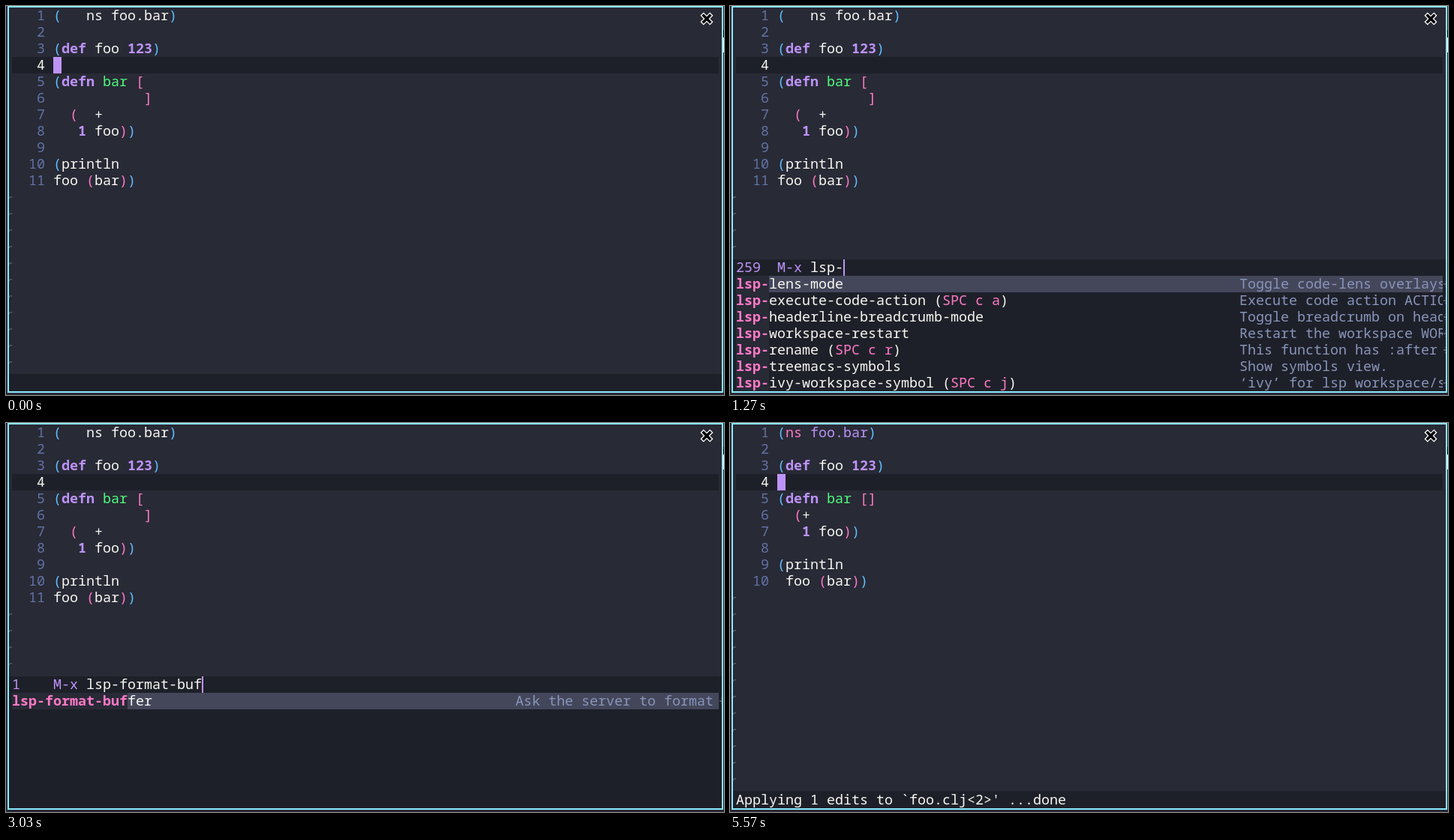
Write an HTML page with a canvas that moves like this. It is 957 px wide and 519 px high and loops after 5660 ms.

```html
<!DOCTYPE html>
<html lang="en">
<head>
<meta charset="utf-8">
<title>Formatting a Clojure buffer</title>
<style>
  html, body { margin: 0; width: 100%; height: 100%; overflow: hidden; background: #282a36; }
  canvas { display: block; }
</style>
</head>
<body>
<canvas id="stage" width="957" height="519"></canvas>
<script>
const ctx = document.getElementById('stage').getContext('2d');
const LOOP = 5660, CW = 11, LH = 22, LEFT = 8, TOP = 2, PANE = 338, ECHO = 492;
const FONT = '18.33px "Noto Sans Mono", "DejaVu Sans Mono", monospace';
const C = {
  bg: '#282a36', dark: '#1e2029', sel: '#44475a', frame: '#8be9fd', mark: '#565761',
  w: '#f8f8f2', b: '#61bfff', p: '#ff79c6', v: '#bd93f9', g: '#50fa7b', n: '#6272a4', d: '#8995bb'
};

// {x...} colours a run with C.x; an upper-case key also makes it bold
const before = [
  '{b(}   ns foo.bar{b)}', '',
  '{b(}{Vdef} foo {V123}{b)}', '',
  '{b(}{Vdefn} {gbar} {p[}',
  '           {p]}',
  '  {p(}  +',
  '   {V1} foo{p)}{b)}', '',
  '{b(}println',
  'foo {p(}bar{p)}{b)}'
];
const after = [
  '{b(}{pns} {vfoo.bar}{b)}', ...before.slice(1, 4),
  '{b(}{Vdefn} {gbar} {p[]}',
  '  {p(}+',
  ...before.slice(7, 10),
  ' foo {p(}bar{p)}{b)}'
];
const afterPlain = ['{b(}ns foo.bar{b)}', ...after.slice(1)];

// name: [description, key binding]
const cmds = {
  'lsp': ['Entry point for the server startup.'],
  'lsp-lens-mode': ['Toggle code-lens overlays.'],
  'lsp-execute-code-action': ['Execute code action ACTION.', 'SPC c a'],
  'lsp-headerline-breadcrumb-mode': ['Toggle breadcrumb on headerline.'],
  'lsp-workspace-restart': ['Restart the workspace WORKSPACE'],
  'lsp-rename': ['This function has :after advice', 'SPC c r'],
  'lsp-treemacs-symbols': ['Show symbols view.'],
  'lsp-ivy-workspace-symbol': ['‘ivy’ for lsp workspace/symbol.', 'SPC c j'],
  'lsp-clojure-server-info': ['Request server info.'],
  'lsp-clojure-cycle-coll': ['Apply cycle-coll refactoring'],
  'lsp-install-server': ['Interactively install server.'],
  'lsp-format-buffer': ['Ask the server to format this document.'],
  'lsp-format-region': ['Ask the server to format the region'],
  'lsp-find-references': ['Find references of the symbol'],
  'lsp-find-definition': ['Find definitions of the symbol'],
  'lsp-find-declaration': ['Find declarations of the symbol'],
  'lsp-find-implementation': ['Find implementations of the symbol'],
  'lsp-find-type-definition': ['Find type definitions of the symbol']
};
const names = Object.keys(cmds);
const common = names.slice(1, 8);
const server = [...names.slice(5, 9), 'lsp', ...names.slice(9, 11)];
const finds = names.slice(11);
const formats = finds.slice(0, 2);
const DONE = "Applying 1 edits to `foo.clj<2>' ...done";

const prompt = (count, input, list, pick = 0, echo = '') =>
  ({ code: before, mini: { count, input, list, pick }, echo });
const edit = (code, echo = '') => ({ code, echo });

const timeline = [
  [0, edit(before)],
  [330, edit(before, 'SPC-')],
  [570, edit(before, 'SPC :')],
  [670, prompt(8761, '', common)],
  [1070, prompt(260, 'lsp', server, 4)],
  [1270, prompt(259, 'lsp-', common)],
  [1330, prompt(12, 'lsp-f', finds)],
  [1500, prompt(2, 'lsp-fo', formats)],
  [1770, prompt(2, 'lsp-for', formats)],
  [2030, prompt(2, 'lsp-form', formats)],
  [2100, prompt(2, 'lsp-forma', formats)],
  [2370, prompt(2, 'lsp-format', formats)],
  [2430, prompt(2, 'lsp-format-', formats)],
  [2730, prompt(1, 'lsp-format-b', formats.slice(0, 1))],
  [2800, prompt(1, 'lsp-format-bu', formats.slice(0, 1))],
  [3030, prompt(1, 'lsp-format-buf', formats.slice(0, 1))],
  [3900, prompt(1, 'lsp-format-buf', formats.slice(0, 1), 0, DONE)],
  [4000, edit(afterPlain, DONE)],
  [4500, edit(after, 'Auto-saving...')],
  [4600, edit(after, 'Auto-saving...done')],
  [5570, edit(after, DONE)]
];

function box(color, x, y, w, h) {
  ctx.fillStyle = color;
  ctx.fillRect(x, y, w, h);
}

function write(markup, col, top) {
  for (const [, key, run, plain] of markup.matchAll(/\{(\w)([^}]*)\}|([^{]+)/g)) {
    const text = plain || run, k = key || 'w', low = k.toLowerCase();
    ctx.font = (k !== low ? 'bold ' : '') + FONT;
    ctx.fillStyle = C[low];
    ctx.fillText(text, LEFT + col * CW, top + 17);
    col += text.length;
  }
}

// bits: rows of a small fringe bitmap
function fringe(bits, x, y) {
  bits.forEach((row, j) => [...row].forEach((on, i) => {
    if (on === '1') box(C.mark, x + i, y + j, 1, 1);
  }));
}

function drawCode(lines, focused) {
  const cur = TOP + 3 * LH;
  box(C.dark, LEFT, cur, 942, LH);
  lines.forEach((line, i) => {
    const y = TOP + i * LH, num = String(i + 1).padStart(4);
    write(`{${i === 3 ? 'w' : 'n'}${num}}`, 0, y);
    write(line, 5, y);
  });
  if (focused) box(C.v, 63, cur, CW, LH);
  for (let i = lines.length; i < 22; i++) fringe(['0111', '1101', '1000'], 4, TOP + i * LH + 10);
}

function drawMini({ count, input, list, pick }, done) {
  box(C.dark, 4, PANE, 950, 176);
  write(`{v${String(count).padEnd(5)}M-x }${input}`, 0, PANE);
  box(C.v, done ? LEFT : LEFT + (9 + input.length) * CW, PANE, 2, LH);
  list.forEach((name, i) => {
    const y = PANE + (i + 1) * LH, n = input.length, [info, key] = cmds[name];
    ctx.save();
    ctx.beginPath();
    ctx.rect(LEFT, y, 942, LH);
    ctx.clip();
    if (i === pick) box(C.sel, LEFT, y, 942, LH);
    if (n) box(C.bg, LEFT, y, n * CW, LH);
    write(`{P${name.slice(0, n)}}${name.slice(n)}${key ? ` ({p${key}})` : ''}`, 0, y);
    write(`{d${info}}`, 61, y);
    ctx.restore();
    if (info.length > 24) fringe(['0001', '0000', '0000', '0111', '0111', '0000', '0000', '0001'], 950, y + 7);
  });
}

function cross(color, width, r) {
  ctx.strokeStyle = color;
  ctx.lineWidth = width;
  ctx.beginPath();
  for (const s of [1, -1]) {
    ctx.moveTo(934 - r, 17 - r * s);
    ctx.lineTo(934 + r, 17 + r * s);
  }
  ctx.stroke();
}

function draw(t) {
  const { code, mini, echo } = timeline.findLast(([start]) => start <= t)[1];
  box(C.bg, 0, 0, 957, 519);
  drawCode(code, !mini);
  if (mini) drawMini(mini, echo);
  else box(C.dark, 4, ECHO - 1, 950, 23);
  if (echo) write(echo, 0, ECHO);
  ctx.strokeStyle = C.frame;
  ctx.lineWidth = 2;
  ctx.strokeRect(3, 1, 952, 514);
  box('#000', 956, 32, 1, 10);
  box('#fff', 956, 42, 1, 20);
  cross('#fff', 6, 6.4);
  cross('#000', 3.6, 5.4);
}

const begin = performance.now();
function tick() {
  draw((performance.now() - begin) % LOOP);
  requestAnimationFrame(tick);
}
tick();
</script>
</body>
</html>
```
